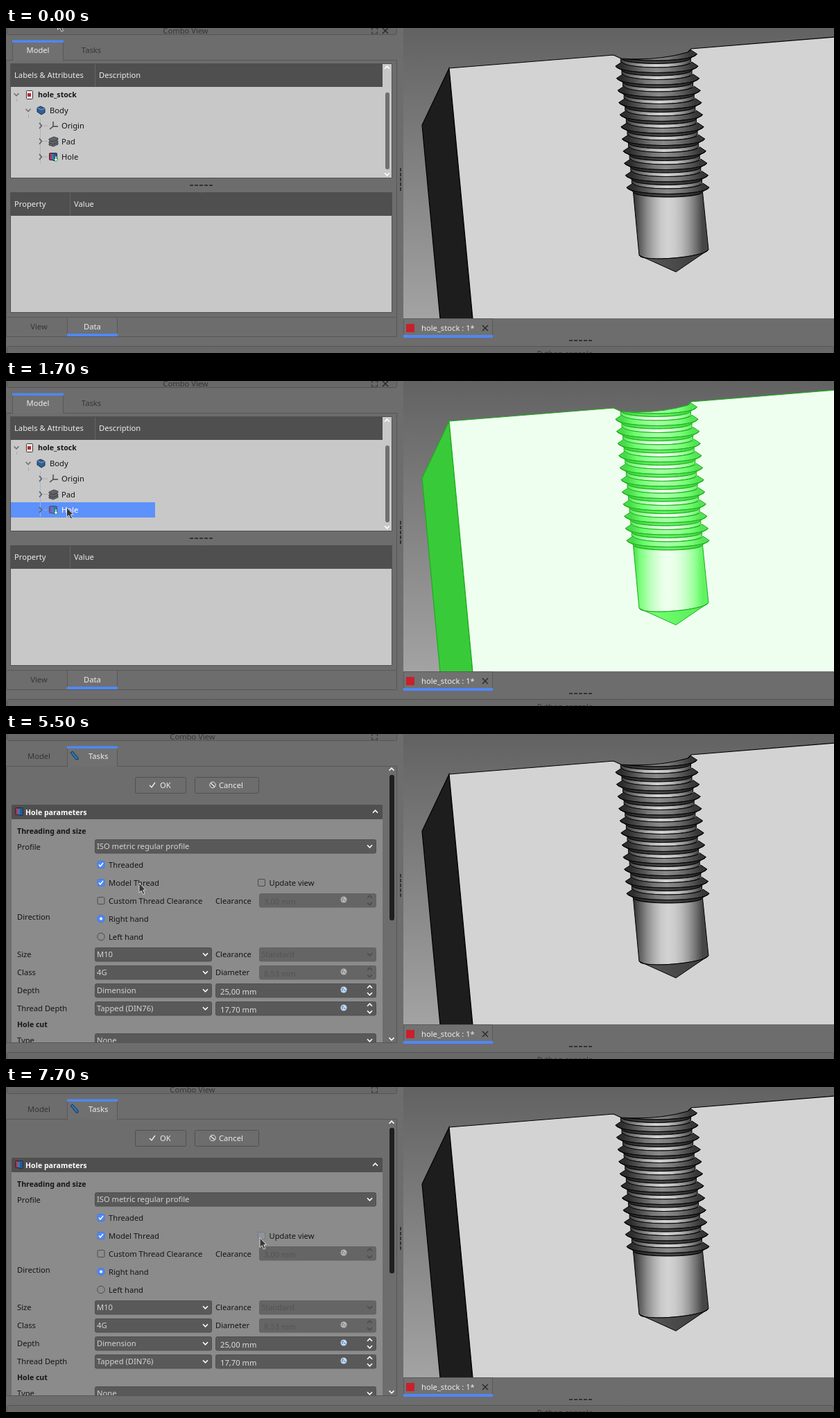
These frames come from a looping animation (1194x469 px, 8 s). An HTML page with a canvas:

```html
<!DOCTYPE html>
<html lang="en">
<head>
<meta charset="utf-8">
<title>Hole parameters</title>
<style>
html, body { margin: 0; width: 1194px; height: 469px; overflow: hidden; background: #6d6d6d; }
canvas { display: block; }
</style>
</head>
<body>
<canvas id="stage" width="1194" height="469"></canvas>
<script>
const ctx = document.getElementById('stage').getContext('2d', { alpha: false });
const LOOP = 8000, BLUE = '#5088f4', LIGHT = '#ececec', INK = '#151515', DIM = '#363636';
let selected = false;

// ---- basic helpers ----
function rect(x0, y0, x1, y1, fill, border, radius = 0) {
  ctx.beginPath();
  const h = border ? .5 : 0;
  ctx.roundRect(x0 + h, y0 + h, x1 - x0 - 2 * h, y1 - y0 - 2 * h, radius);
  if (fill) { ctx.fillStyle = fill; ctx.fill(); }
  if (border) { ctx.strokeStyle = border; ctx.lineWidth = 1; ctx.stroke(); }
}
function text(s, x, y, color = INK, bold = false, align = 'left') {
  ctx.font = (bold ? 'bold 10.6px' : '11.2px') + ' "Noto Sans", sans-serif';
  ctx.textAlign = align;
  ctx.fillStyle = color;
  ctx.fillText(s, x, y + 4);
}
function line(points, color, width = 1) {
  ctx.beginPath();
  points.forEach(p => ctx.lineTo(...p));
  ctx.strokeStyle = color;
  ctx.lineWidth = width;
  ctx.stroke();
}
function poly(points, fill, stroke, width = 1) {
  ctx.beginPath();
  points.forEach(p => ctx.lineTo(...p));
  ctx.closePath();
  if (fill) { ctx.fillStyle = fill; ctx.fill(); }
  if (stroke) { ctx.strokeStyle = stroke; ctx.lineWidth = width; ctx.stroke(); }
}
function disc(x, y, r, fill, border) {
  ctx.beginPath();
  ctx.arc(x, y, r, 0, 7);
  if (fill) { ctx.fillStyle = fill; ctx.fill(); }
  if (border) { ctx.strokeStyle = border; ctx.lineWidth = 1; ctx.stroke(); }
}
// direction: 1 points down, -1 points up
function chevron(x, y, direction, color, size = 3.5, width = 1.6) {
  const h = direction * size / 2;
  line([[x - size, y - h], [x, y + h], [x + size, y - h]], color, width);
}
function cross(x, y, r = 4) {
  line([[x - r, y - r], [x + r, y + r]], '#2a2a2a', 1.5);
  line([[x - r, y + r], [x + r, y - r]], '#2a2a2a', 1.5);
}
function clipped(x0, y0, x1, y1, draw) {
  ctx.save();
  ctx.beginPath();
  ctx.rect(x0, y0, x1 - x0, y1 - y0);
  ctx.clip();
  draw();
  ctx.restore();
}

// ---- 3D view ----
const shade = v => selected ? `rgb(${v + 28},${v + 173},${v + 28})` : `rgb(${v},${v},${v})`;
function gradient(a, b, values) {
  const g = ctx.createLinearGradient(...a, ...b);
  values.forEach((v, i) => g.addColorStop(i / (values.length - 1), shade(v)));
  return g;
}
// half ellipse hanging below the chord from a to b
function halfEllipse(a, b, sag) {
  const dx = (b[0] - a[0]) * .05, drop = sag * 4 / 3;
  ctx.bezierCurveTo(a[0] + dx, a[1] + drop, b[0] - dx, b[1] + drop, ...b);
}
// rings are [left, right, sag]
function band([l0, r0, sag0], [l1, r1, sag1], values) {
  ctx.beginPath();
  ctx.moveTo(...l0);
  halfEllipse(l0, r0, sag0);
  ctx.lineTo(...r1);
  halfEllipse(r1, l1, sag1);
  ctx.closePath();
  ctx.fillStyle = gradient(l0, r0, values);
  ctx.fill();
  ctx.strokeStyle = shade(0);
  ctx.lineWidth = 1;
  ctx.stroke();
}
function threadRing(turn, inset, dy, sag) {
  const x = 1.6 * turn, y = 55 + 17.5 * turn + dy;
  return [[879 + x + inset, y], [998 + x - inset, y], sag];
}
function facePath() {
  ctx.beginPath();
  ctx.moveTo(639, 58);
  ctx.lineTo(876, 39);
  ctx.lineTo(887, 44);
  ctx.quadraticCurveTo(938, 48, 983, 35);
  ctx.lineTo(988, 30);
  ctx.lineTo(1196, 13);
  ctx.lineTo(1196, 425);
  ctx.lineTo(673.5, 425);
  ctx.closePath();
}
function drawView() {
  const sky = ctx.createLinearGradient(0, 0, 0, 419);
  sky.addColorStop(0, '#626262');
  sky.addColorStop(1, '#a3a3a3');
  ctx.fillStyle = sky;
  ctx.fillRect(573, 0, 621, 419);
  const edge = shade(0);
  poly([[639, 58], [600, 140], [626.5, 425], [673.5, 425]], shade(29), edge, 1.2);
  facePath();
  ctx.fillStyle = shade(211);
  ctx.fill();

  ctx.save();
  ctx.clip();
  for (let turn = -1; turn <= 10; turn++) {
    const tip = threadRing(turn, 0, 0, 9.5), floor = threadRing(turn, 9, 6, 8);
    band(threadRing(turn, 9, -6, 8), tip, [45, 80, 120, 138, 122, 90, 55]);
    band(tip, floor, [30, 42, 60, 70, 60, 45, 32]);
    if (turn < 10) band(floor, threadRing(turn, 9, 11.5, 8), [60, 120, 180, 211, 195, 140, 70]);
  }
  const rim = [[913, 328], [1013, 320], 8];
  band(threadRing(10, 9.5, 7, 7), rim, [45, 95, 140, 175, 200, 211, 203, 185, 155, 115, 70]);
  band(rim, [[966, 352], [966, 352], 0], [95, 82, 74, 66, 60]);
  ctx.restore();

  facePath();
  ctx.strokeStyle = edge;
  ctx.lineWidth = 1.2;
  ctx.stroke();
}

// ---- window frame ----
function dashes(x, y, vertical) {
  for (let i = 0; i < 5; i++) {
    const d = i * 7;
    if (vertical) rect(x, y + d, x + 2, y + d + 5, '#333');
    else rect(x + d, y, x + d + 5, y + 2, '#333');
  }
}
function drawFrame(tasks) {
  rect(0, 0, 1194, 469, '#6d6d6d');
  clipped(573, 0, 1194, 419, drawView);
  rect(1, -5, 564, 10, '#686868', '#555', 2);
  text('Combo View', tasks ? 269 : 259, 4, DIM, false, 'center');
  for (const [sx, sy] of [[-1, -1], [1, -1], [-1, 1], [1, 1]]) {
    const x = 531.5 + 4 * sx, y = 4 + 4 * sy;
    line([[x - 3 * sx, y], [x, y], [x, y - 3 * sy]], '#333');
  }
  if (!tasks) cross(547, 4);
  rect(0, 46, 564, 446, '#6d6d6d', '#565656');
  const [x0, x1] = tasks ? [88, 161] : [9, 83];
  rect(x0, 18, x1, 47, '#707070', '#595959');
  rect(x0 + 1, 46, x1 - 1, 48, '#6e6e6e');
  rect(x0, 17.6, x1, 21, BLUE);
  dashes(568, 202, true);
  dashes(812, 450);
  rect(1, 459, 1194, 475, '#686868', '#555', 2);
  text('Python console', 806, 470, DIM, false, 'center');

  rect(573, 419, 702, 446, '#717171', '#5a5a5a');
  rect(573, 443, 702, 447, BLUE);
  rect(577, 427, 589, 439, '#c8202c');
  text('hole_stock : 1*', 599, 433, LIGHT);
  cross(691, 433);
}

// ---- model tab ----
function scrollbar(y0, y1, handle0, handle1) {
  rect(543, y0, 556, y1, '#c8c8c8');
  chevron(549.5, y0 + 5, -1, '#fff');
  chevron(549.5, y1 - 5, 1, '#fff');
  rect(547, handle0, 553, handle1, '#707070', null, 3);
}
function table(y0, y1, split, first, second) {
  rect(6, y0, 557, y1, '#c8c8c8', '#505050');
  rect(7, y0 + 1, 556, y0 + 34, '#4f4f4f');
  rect(split, y0 + 1, split + 1, y0 + 34, '#656565');
  text(first, 12, y0 + 17, LIGHT);
  text(second, split + 6, y0 + 17, LIGHT);
}
function holeIcon(x, y) {
  rect(x - 6, y - 6, x + 1, y + 5, '#d5202d', '#402020', 1);
  rect(x - 1, y - 6, x + 6, y + 6, '#29588d', '#1b304a', 1);
  rect(x - 3, y - 4, x + 1, y + 4, '#3a75b4');
}
function drawTree() {
  table(51, 217, 128, 'Labels & Attributes', 'Description');
  scrollbar(52, 216, 93, 204);
  if (selected) rect(7, 175, 215, 197, '#5d91fc');
  line([[15.5, 102], [15.5, 106]], '#aaa');
  line([[32.5, 125], [32.5, 130]], '#aaa');
  line([[49.5, 130], [49.5, 196]], selected ? '#9fb6dc' : '#b2b2b2');
  chevron(15, 96, 1, '#707070');
  chevron(32, 118.5, 1, '#707070');
  for (const y of [141, 163.5, 186]) {
    line([[48, y - 4], [51.5, y], [48, y + 4]], '#5f5f5f', 1.6);
    line([[54, y], [60, y]], '#a8a8a8');
  }
  rect(29, 90, 39, 103, '#f2f2f2', '#333', 1);
  rect(31, 94, 36, 99, '#c8202c');
  poly([[45, 115], [50, 113], [56, 116], [56, 122], [51, 125], [45, 121]], '#315f95', '#1b304a');
  line([[45, 115], [51, 118], [56, 116]], '#82aad5');
  line([[68, 135], [68, 142], [75, 142]], '#444', 1.4);
  line([[68, 142], [63, 146]], '#444', 1.4);
  for (const y of [167, 164, 160])
    poly([[62, y], [69, y - 3], [75, y - 1], [75, y + 1], [68, y + 4], [62, y + 2]], '#606468', '#303030', .7);
  holeIcon(68, 186);
  if (selected) rect(61, 179, 75, 193, 'rgba(93,145,252,.4)');
  poly([[71, 185], [73, 185], [73, 189], [75, 189], [72, 193], [69, 189], [71, 189]], '#fff', '#2d9b38', .8);
  text('hole_stock', 46, 96, INK, true);
  text('Body', 63, 118.5);
  text('Origin', 80, 141);
  text('Pad', 80, 163.5);
  text('Hole', 80, 186, selected ? '#fff' : INK);
}
function drawProperties(filled) {
  table(237, 411, 92, 'Property', 'Value');
  if (!filled) return;
  const rows = [['Base'], ['Label', 'Hole'], ['Hole'], ['Threaded', 'true'], ['Model Thr...', 'true'],
    ['Thread Ty...', 'ISOMetricProfile'], ['Thread Size', 'M10'], ['', '']];
  clipped(7, 270, 543, 410, () => rows.forEach(([name, value], i) => {
    const y = 270 + i * 19.9, group = value === undefined;
    rect(7, y, 543, y + 20, group ? '#8c8c8c' : i % 2 ? '#bebebe' : '#c6c6c6');
    line([[7, Math.round(y) + .5], [543, Math.round(y) + .5]], '#9c9c9c');
    if (group) return text(name, 27, y + 10, '#4d4d4d', true);
    line([[92.5, y], [92.5, y + 20]], '#9c9c9c');
    line([[15.5, y], [15.5, y + 20]], '#acacac');
    line([[15, y + 10], [23, y + 10]], '#acacac');
    text(name, 27, y + 10);
    text(value, 96, y + 10);
  }));
  scrollbar(238, 410, 250, 259);
}
function drawModel(t) {
  text('Model', 46, 32, LIGHT, false, 'center');
  text('Tasks', 123, 32, DIM, false, 'center');
  drawTree();
  dashes(265, 226);
  drawProperties(t >= 1800);
  rect(0, 417, 564, 418, '#5a5a5a');
  rect(88, 417, 161, 445, '#707070', '#595959');
  rect(88, 441, 161, 445, BLUE);
  text('View', 47.5, 431, DIM, false, 'center');
  text('Data', 124.5, 431, LIGHT, false, 'center');
}

// ---- tasks tab ----
function field(x0, x1, y, off) {
  rect(x0, y - 10, x1, y + 10.5, off ? '#656565' : '#595959', off ? '#626262' : '#4f4f4f', 2);
}
function combo(x0, x1, y, value, off) {
  field(x0, x1, y, off);
  text(value, x0 + 3, y, off ? '#545454' : '#d4d4d4');
  chevron(x1 - 9.5, y, 1, off ? '#4c4c4c' : '#fff');
}
function spin(x0, y, value, off) {
  field(x0, 534, y, off);
  text(value, x0 + 7, y + 2, off ? '#545454' : '#dedede');
  for (const d of [-1, 1]) chevron(524.5, y + d * 5, d, off ? '#4c4c4c' : '#fff');
  disc(487, y - 1, 4.5, off ? '#b5b5b5' : '#c3d9f2');
  line([[485, y + 1], [485, y - 3], [487, y - 3]], off ? '#777' : '#3c70ad');
  line([[487, y - 1], [490, y + 1]], off ? '#777' : '#3c70ad');
}
function check(x, y, label, on, hover) {
  const border = on ? '#477bdd' : hover ? '#6b7c9c' : '#4c4c4c';
  rect(x - 5.5, y - 5.5, x + 5.5, y + 5.5, on ? BLUE : hover ? '#949494' : '#8b8b8b', border, 1.5);
  if (on) line([[x - 3, y], [x - 1, y + 2.5], [x + 3, y - 2.5]], '#fff', 1.5);
  text(label, x + 11, y);
}
function radio(y, label, on) {
  disc(137, y, 5.3, on ? BLUE : '#8b8b8b', on ? '#477bdd' : '#4c4c4c');
  if (on) disc(137, y, 2, '#fff');
  text(label, 148, y);
}
function drawTasks(t) {
  text('Model', 47.5, 32, DIM, false, 'center');
  text('Tasks', 119, 32, LIGHT);
  poly([[93, 27], [96, 25], [104, 34], [104, 37], [101, 37]], '#2d6fb0', '#18344f');

  rect(553, 59, 560, 269, '#1f1f1f', null, 3);
  chevron(556, 51, -1, '#fff');
  chevron(556, 440, 1, '#fff');
  rect(186, 62, 260, 86, '#6d6d6d', '#505050', 2);
  rect(272, 62, 365, 86, '#6d6d6d', '#505050', 2);
  line([[207, 74], [210, 77], [215, 70]], LIGHT, 1.4);
  text('OK', 222, 74, LIGHT);
  disc(298, 73.5, 4.2, null, LIGHT);
  line([[295, 70.5], [301, 76.5]], LIGHT, 1.2);
  text('Cancel', 307, 74, LIGHT);

  rect(8, 123, 543, 445, '#8b8b8b');
  rect(8, 102, 543, 123, '#4f4f4f', null, 2);
  holeIcon(19, 112);
  text('Hole parameters', 28, 112.5, '#fff', true);
  chevron(532.5, 112, -1, '#fff');

  clipped(8, 123, 543, 445, () => {
    text('Threading and size', 16, 139.5, INK, true);
    const labels = [['Profile', 162.5], ['Direction', 264], ['Size', 318], ['Class', 344],
      ['Depth', 370], ['Thread Depth', 396], ['Type', 442]];
    labels.forEach(([s, y]) => text(s, 16, y));
    text('Clearance', 302, 240.5);
    text('Clearance', 302, 318);
    text('Diameter', 302, 344);
    text('Hole cut', 16, 419, INK, true);
    combo(128, 534, 162, 'ISO metric regular profile');
    check(137, 188.5, 'Threaded', true);
    check(137, 214.5, 'Model Thread', true);
    check(368.5, 214.5, 'Update view', false, t >= 7700);
    check(137, 240.5, 'Custom Thread Clearance', false);
    radio(266.5, 'Right hand', true);
    radio(292.5, 'Left hand', false);
    combo(128, 297, 318, 'M10');
    combo(128, 297, 344, '4G');
    combo(128, 297, 370, 'Dimension');
    combo(128, 297, 396, 'Tapped (DIN76)');
    combo(128, 534, 442, 'None');
    combo(365, 534, 318, 'Standard', true);
    spin(365, 240, '3,00 mm', true);
    spin(365, 344, '8,53 mm', true);
    spin(302, 370, '25,00 mm');
    spin(302, 396, '17,70 mm');
  });
}

// ---- pointer: [time, x, y] ----
const route = [[500, 74, -12], [700, 70, 12], [1100, 92, 148], [1400, 87, 182], [5200, 87, 182],
  [5700, 261, 236], [5900, 220, 241], [6100, 162, 241], [6300, 156, 241], [6700, 156, 241],
  [6800, 252, 211], [6900, 252, 211], [7000, 272, 203], [7300, 381, 211], [7500, 365.5, 217]];
function pointerAt(t) {
  const next = route.findIndex(p => p[0] > t);
  if (next === 0) return route[0].slice(1);
  if (next < 0) return route[route.length - 1].slice(1);
  const [t0, x0, y0] = route[next - 1], [t1, x1, y1] = route[next];
  const k = (t - t0) / (t1 - t0);
  return [x0 + (x1 - x0) * k, y0 + (y1 - y0) * k];
}
function drawPointer([x, y]) {
  const arrow = [[0, 0], [0, 14], [3.2, 11.2], [5.6, 16.6], [8, 15.5], [5.8, 10.3], [9.5, 10]];
  poly(arrow.map(([dx, dy]) => [x + .5 + dx, y + .5 + dy]), '#383838', '#dcdcdc');
}

function render(now) {
  const t = Math.floor(now % LOOP / 100) * 100;
  const tasks = t >= 4400;
  selected = t >= 1700 && !tasks;
  drawFrame(tasks);
  if (tasks) drawTasks(t); else drawModel(t);
  drawPointer(pointerAt(t));
  requestAnimationFrame(render);
}
render(0);
</script>
</body>
</html>
```
